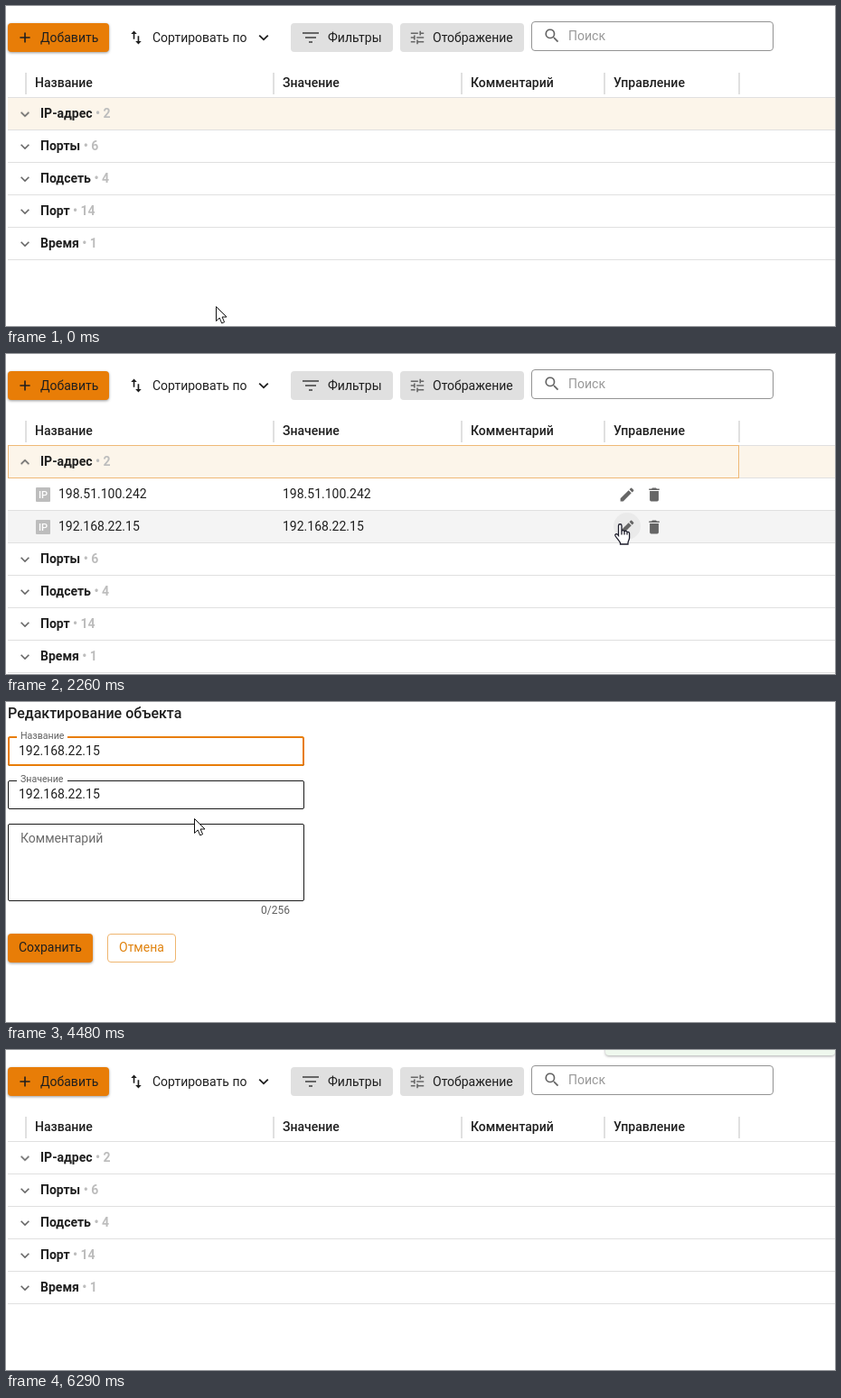
Write an HTML page that moves like this. It is 917 px wide and 355 px high and loops after 6.95 s.

```html
<!DOCTYPE html>
<html lang="ru">
<head>
<meta charset="utf-8">
<title>Редактирование объекта</title>
<style>
html, body { margin: 0; width: 100%; height: 100%; overflow: hidden; background: #fff; }
svg { display: block; width: 917px; height: 355px; font: 14px Roboto, sans-serif; fill: #1f1f1f; }
text { white-space: pre; }
.head { font-weight: 500; }
.group { font-weight: 700; }
.group tspan { fill: #bdbdbd; }
.rule { fill: none; stroke: #e0e0e0; }
.icon { fill: #666; }
.primary { fill: #e87d07; filter: drop-shadow(0 1px 1.5px #0006); }
.grey { fill: #e0e0e0; }
.small { font-size: 10.6px; fill: var(--label); }
.box { fill: none; stroke: var(--line); }
.focus { fill: none; stroke: #e87d07; stroke-width: 2; }
.value { fill: var(--ink); }

/* One 6950 ms loop: hard changes use step-end, motion is linear */
.step { animation: 6950ms step-end infinite; }
.move { animation: 6950ms linear infinite; }

#list { animation-name: list; }
@keyframes list { 0%, 86.33% { opacity: 1 } 34.82% { opacity: 0 } }
#form { animation-name: form; }
@keyframes form {
  0% { opacity: 0; --line: #1a1a1a; --ink: #1f1f1f; --label: #5f5f5f; --hint: #6b6b6b; --save: #e87d07; --saveInk: #1f1f1f; --cancel: #e0830f; --edge: #efb56f; --shade: #0006 }
  34.82% { opacity: 1; --line: #1a1a1a; --ink: #1f1f1f; --label: #5f5f5f; --hint: #6b6b6b; --save: #e87d07; --saveInk: #1f1f1f; --cancel: #e0830f; --edge: #efb56f; --shade: #0006 }
  81.15% { opacity: 1; --line: #b9b9b9; --ink: #989898; --label: #8a8a8a; --hint: #8c8c8c; --save: #d3c4b3; --saveInk: #0000; --cancel: #c4b49f; --edge: #e8dacb; --shade: #0000 }
  86.33%, 100% { opacity: 0 }
}

#first { animation-name: first; }
@keyframes first {
  0%, 13.24% { fill: #fcf5ea }
  14.6%, 15.36% { fill: #fbeee1 }
  15.4%, 86.3% { fill: #fcf5ea }
  86.33%, 100% { fill: #fff }
}
#outline { animation-name: outline; }
@keyframes outline { 0%, 86.33% { opacity: 0 } 13.53% { opacity: 1 } }
#details { animation-name: details; }
@keyframes details { 0%, 34.82% { opacity: 0 } 15.4% { opacity: 1 } }
#rest { animation-name: rest; }
@keyframes rest { 0%, 86.33% { transform: none } 15.4% { transform: translateY(72px) } }
#toggle { transform-origin: 21px 120px; animation-name: toggle; }
@keyframes toggle { 0%, 86.33% { transform: none } 15.4% { transform: rotate(180deg) } }
#hover { animation-name: hover; }
@keyframes hover { 0%, 34.82% { opacity: 0 } 31.22% { opacity: 1 } }

#focus1 { animation-name: focus1; }
@keyframes focus1 { 0%, 70.07% { opacity: 0 } 51.8% { opacity: 1 } }
#focus2 { animation-name: focus2; }
@keyframes focus2 { 0%, 81.15% { opacity: 0 } 70.07% { opacity: 1 } }
#typed1 { animation-name: typed1; }
@keyframes typed1 { 0% { fill-opacity: 0 } 64.89%, 100% { fill-opacity: 1 } }
#typed2 { animation-name: typed2; }
@keyframes typed2 { 0% { fill-opacity: 0 } 72.09%, 100% { fill-opacity: 1 } }

#spinner { fill: none; stroke: #a89a8a; stroke-width: 2; transform-origin: 49px 273px; animation-name: spinner; }
@keyframes spinner {
  0%, 81.14% { opacity: 0; transform: rotate(25deg); stroke-dasharray: .5 50 }
  81.15% { opacity: 1; transform: rotate(25deg); stroke-dasharray: .5 50 }
  86.33%, 100% { opacity: 1; transform: rotate(300deg); stroke-dasharray: 28 50 }
}
#toast { fill: #eff8ee; filter: drop-shadow(0 1px 1.5px #0005); animation-name: toast; }
@keyframes toast {
  0%, 89.21% { transform: translateY(-12px) }
  90.4%, 100% { transform: none }
}

#pointer { animation-name: pointer; }
@keyframes pointer {
  0%, .29% { transform: translate(232px, 333px) }
  .58%, 3.17% { transform: translate(211px, 340px) }
  5.47% { transform: translate(168px, 320px) }
  7.19% { transform: translate(115px, 270px); animation-timing-function: ease-out }
  12.37% { transform: translate(23px, 117px) }
  12.95%, 18.13% { transform: translate(21px, 122px) }
  20.14% { transform: translate(120px, 109px) }
  24.46% { transform: translate(500px, 160px); animation-timing-function: ease-out }
  26.62% { transform: translate(680px, 188px) }
  28.06% { transform: translate(672px, 189px) }
  28.92%, 31.22% { transform: translate(669px, 188px) }
  32.37%, 33.53% { transform: translate(679px, 188px) }
  35.11% { transform: translate(640px, 185px) }
  37.99% { transform: translate(490px, 179px) }
  41.01%, 41.29% { transform: translate(411px, 170px) }
  47.48% { transform: translate(147px, 72px) }
  48.63% { transform: translate(135px, 63px) }
  49.5%, 53.96% { transform: translate(142px, 62px) }
  61.15%, 66.47% { transform: translate(208px, 129px) }
  69.5%, 72.81% { transform: translate(170px, 102px) }
  79.71%, 82.88% { transform: translate(45px, 281px) }
  89.78% { transform: translate(865px, 350px) }
  90.43%, 100% { transform: translate(930px, 370px) }
}
#arrow { animation-name: arrow; }
@keyframes arrow {
  0%, 22.45%, 34.82%, 54.89%, 60.07%, 73.45%, 77.37%, 81.15%, 100% { opacity: 1 }
  6.91%, 26.33%, 47.84%, 56.62%, 67.6%, 74.04%, 78.79% { opacity: 0 }
}
#hand { animation-name: hand; }
@keyframes hand {
  0%, 22.45%, 34.82%, 81.15%, 100% { opacity: 0 }
  6.91%, 26.33%, 78.79% { opacity: 1 }
}
#beam { animation-name: beam; }
@keyframes beam {
  0%, 54.89%, 60.07%, 73.45%, 77.37%, 100% { opacity: 0 }
  47.84%, 56.62%, 67.6%, 74.04% { opacity: 1 }
}
</style>
</head>
<body>
<svg viewBox="0 0 917 355">
  <defs>
    <!-- icons centred on 0,0 in a 24px grid -->
    <path id="plus" d="M7 1H1v6h-2V1h-6v-2h6v-6h2v6h6z"/>
    <path id="chevron" d="M4.6-3.4 0 1.2l-4.6-4.6L-6-2l6 6 6-6z"/>
    <path id="swap" d="M4 5V-2H2v7h-3l4 4 4-4zM-3-9l-4 4h3v7h2v-7h3z"/>
    <path id="filter" d="M-2 6h4V4h-4zM-9-6v2H9v-2zM-6 1H6v-2H-6z"/>
    <path id="tune" d="M-9 5v2h6V5zM-9-7v2H1v-2zM1 9V7h8V5H1V3h-2v6zM-5-3v2h-4v2h4v2h2v-6zM9 1v-2H-1v2zM3-3h2v-2h4v-2H5v-2H3z"/>
    <path id="search" fill-rule="evenodd" d="M3.5 2h-.8l-.3-.3A6.5 6.5 0 1 0 1.7 2.4l.3.3v.8l5 5L8.5 7zM-2.5 2a4.5 4.5 0 1 1 0-9 4.5 4.5 0 0 1 0 9z"/>
    <path id="edit" d="M-9 5.25V9h3.75L5.8-2.06 2.06-5.8zM8.7-4.96a1 1 0 0 0 0-1.41L6.37-8.7a1 1 0 0 0-1.41 0L3.13-6.88l3.75 3.75z"/>
    <path id="trash" d="M-6 7a2 2 0 0 0 2 2h8a2 2 0 0 0 2-2V-5H-6zM7-8H3.5l-1-1h-5l-1 1H-7v2H7z"/>
    <g id="tools" class="icon">
      <use href="#edit" transform="translate(687 0) scale(.82)"/>
      <use href="#trash" transform="translate(717 0) scale(.82)"/>
    </g>
    <g id="badge">
      <rect x="33" y="-8" width="16" height="16" rx="1" fill="#bdbdbd"/>
      <text x="36" y="4.2" font-size="11" font-weight="500" fill="#fff">IP</text>
    </g>
    <use id="mark" href="#chevron" class="icon" transform="translate(21 120) scale(.82)"/>
  </defs>

  <g id="list" class="step">
    <rect class="primary" x="2" y="19" width="112" height="32" rx="4"/>
    <use href="#plus" transform="translate(21 35) scale(.8)"/>
    <text x="38" y="40">Добавить</text>
    <use href="#swap" transform="translate(144 35) scale(.82)"/>
    <text x="162" y="40">Сортировать по</text>
    <use href="#chevron" transform="translate(285 35) scale(.9)"/>
    <rect class="grey" x="315" y="19" width="113" height="32" rx="4"/>
    <use href="#filter" class="icon" transform="translate(337 35)"/>
    <text x="356" y="40">Фильтры</text>
    <rect class="grey" x="436" y="19" width="137" height="32" rx="4"/>
    <use href="#tune" class="icon" transform="translate(455 35) scale(.8)"/>
    <text x="472" y="40">Отображение</text>
    <rect x="581.5" y="17.5" width="267" height="32" rx="3.5" fill="#fff" stroke="#939393"/>
    <use href="#search" class="icon" transform="translate(604 33) scale(.84)"/>
    <text x="622" y="38" fill="#999">Поиск</text>

    <path class="rule" stroke-width="2" d="M22 74v24M296 74v24M504 74v24M662 74v24M811 74v24"/>
    <g class="head">
      <text x="32" y="90">Название</text>
      <text x="306" y="90">Значение</text>
      <text x="514" y="90">Комментарий</text>
      <text x="672" y="90">Управление</text>
    </g>

    <rect id="first" class="move" x="2" y="102" width="915" height="35"/>
    <path class="rule" d="M2 101.5H917M2 137.5H917"/>
    <rect id="outline" class="step" x="2.5" y="101.5" width="808" height="36" fill="none" stroke="#efb977"/>
    <g id="toggle" class="step"><use href="#mark"/></g>
    <text class="group" x="38" y="124">IP-адрес<tspan> • 2</tspan></text>

    <g id="details" class="step">
      <rect id="hover" class="step" x="2" y="174" width="915" height="35" fill="#f4f4f4"/>
      <path class="rule" d="M2 173.5H917M2 209.5H917"/>
      <use href="#badge" y="156"/>
      <text x="58" y="160">198.51.100.242</text>
      <text x="306" y="160">198.51.100.242</text>
      <use href="#tools" y="156"/>
      <use href="#badge" y="192"/>
      <text x="58" y="196">192.168.22.15</text>
      <text x="306" y="196">192.168.22.15</text>
      <g id="hover" class="step"><circle cx="687" cy="191" r="15" fill="#0000000a"/></g>
      <use href="#tools" y="192"/>
    </g>

    <g id="rest" class="step">
      <path class="rule" d="M2 173.5H917M2 209.5H917M2 245.5H917M2 281.5H917"/>
      <use href="#mark" y="36"/><use href="#mark" y="72"/>
      <use href="#mark" y="108"/><use href="#mark" y="144"/>
      <g class="group">
        <text x="38" y="160">Порты<tspan> • 6</tspan></text>
        <text x="38" y="196">Подсеть<tspan> • 4</tspan></text>
        <text x="38" y="232">Порт<tspan> • 14</tspan></text>
        <text x="38" y="268">Время<tspan> • 1</tspan></text>
      </g>
    </g>
  </g>

  <g id="form" class="step">
    <text class="head" x="2" y="18" font-size="16">Редактирование объекта</text>
    <rect class="box" x="2.5" y="39.5" width="327" height="31" rx="1.5"/>
    <rect id="focus1" class="focus step" x="3" y="39" width="326" height="31" rx="1.5"/>
    <rect x="12" y="36" width="56" height="6" fill="#fff"/>
    <text class="small" x="16" y="41">Название</text>
    <text class="value" x="14" y="59">192.168.22.15<tspan id="typed1" class="step">0</tspan></text>

    <rect class="box" x="2.5" y="87.5" width="327" height="31" rx="1.5"/>
    <rect id="focus2" class="focus step" x="3" y="87" width="326" height="31" rx="1.5"/>
    <rect x="12" y="84" width="56" height="6" fill="#fff"/>
    <text class="small" x="16" y="89">Значение</text>
    <text class="value" x="14" y="107">192.168.22.15<tspan id="typed2" class="step">0</tspan></text>

    <rect class="box" x="2.5" y="135.5" width="327" height="85" rx="1.5"/>
    <text x="16" y="156" style="fill: var(--hint)">Комментарий</text>
    <text x="282" y="235" font-size="12" fill="#616161">0/256</text>

    <rect x="2" y="257" width="94" height="32" rx="4" style="fill: var(--save); filter: drop-shadow(0 1px 1.5px var(--shade))"/>
    <text x="14" y="277" style="fill: var(--saveInk)">Сохранить</text>
    <circle id="spinner" class="move" cx="49" cy="273" r="6.7"/>
    <rect x="112.5" y="257.5" width="75" height="31" rx="3.5" fill="none" style="stroke: var(--edge)"/>
    <text x="125" y="277" style="fill: var(--cancel)">Отмена</text>
  </g>

  <rect id="toast" class="move" x="663" y="-44" width="254" height="50" rx="4"/>

  <g id="pointer" class="move">
    <path id="arrow" class="step" fill="#fff" stroke="#111" d="M.5.5V16.5L4.2 13l2.5 5.9 2.9-1.2L7.1 12H12z"/>
    <g id="hand" class="step">
      <path transform="translate(-6)" fill="#fff" stroke="#1d1d2b" stroke-width="1.3" d="M4.5 2.5a1.75 1.75 0 0 1 3.5 0v6a1.6 1.6 0 0 1 3 .6 1.6 1.6 0 0 1 3 .8 1.5 1.5 0 0 1 2.6 1V16c0 2-1.6 3.5-1.6 5.5V23H6.5v-1.5C5.5 19 2.5 16.5 1 13.8c-.9-1.8 1.2-2.9 2.4-1.6l1.1 1.3zM8 8.5v4M11 9.5v3M14 10.5v2"/>
    </g>
    <path id="beam" class="step" fill="none" stroke="#222" d="M-3.5-8.5h3m1 0h3M0-8V8M-3.5 8.5h3m1 0h3"/>
  </g>
</svg>
</body>
</html>
```
